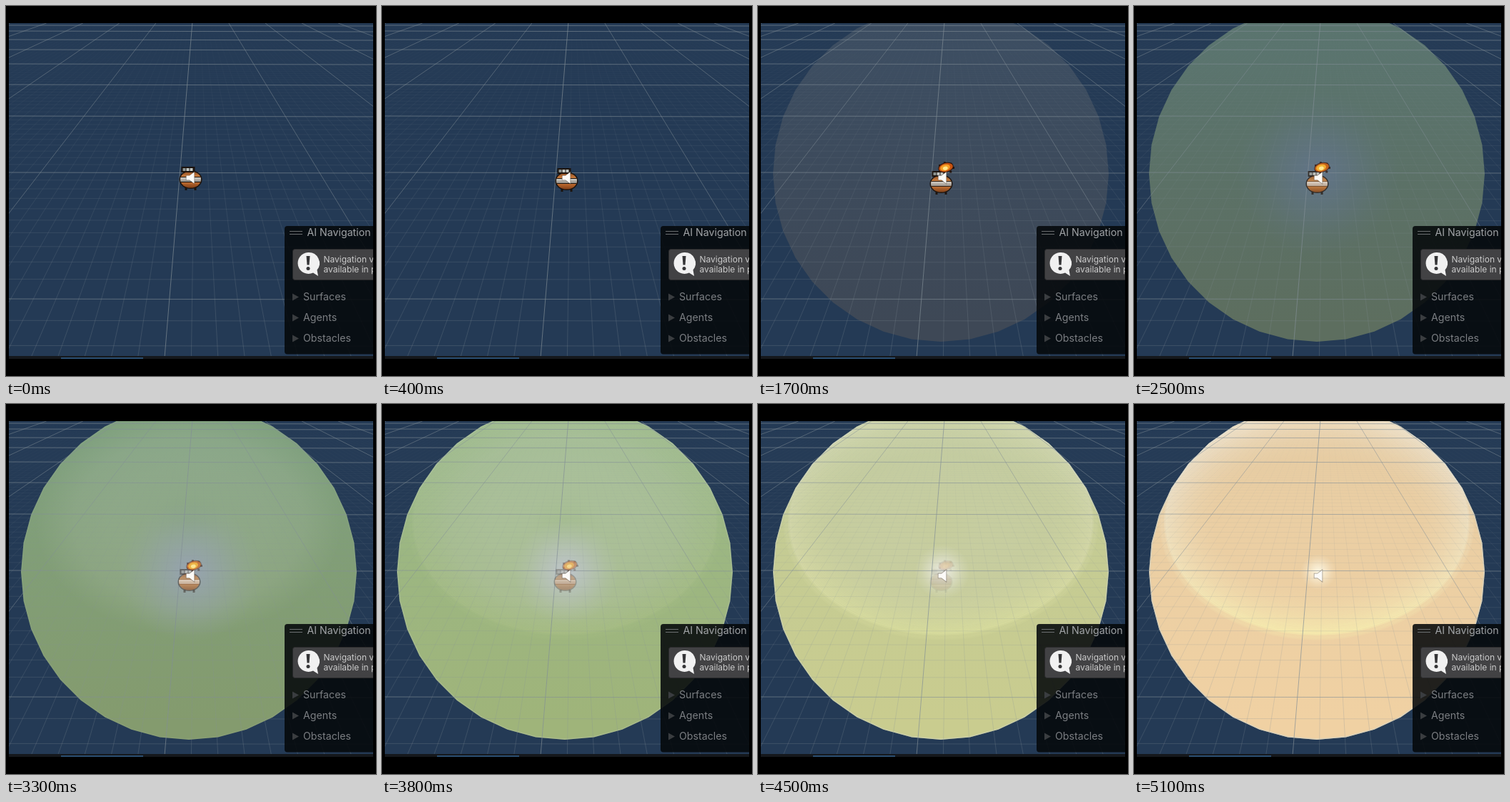
These frames come from a looping animation (518x518 px, 5.2 s). An HTML page with a canvas:

```html
<!DOCTYPE html>
<html lang="en">
<head>
<meta charset="utf-8">
<title>Charge sphere</title>
<style>
  html, body { margin: 0; width: 100%; height: 100%; overflow: hidden; background: #000; }
  canvas, svg { position: absolute; left: 0; top: 0; width: 518px; height: 518px; display: block; }
  text { font-family: Inter, Roboto, sans-serif; }
  .head { font-size: 14.2px; fill: #a0a3a6; }
  .note { font-size: 12px; fill: #cbcbcb; }
  .item { font-size: 14.2px; fill: #7b7e82; }
</style>
</head>
<body>
<canvas id="stage" width="518" height="518"></canvas>
<svg viewBox="0 0 518 518">
  <defs><clipPath id="view"><rect x="4" y="24" width="510" height="466"/></clipPath></defs>
  <g clip-path="url(#view)">
    <rect x="390" y="308" width="140" height="179.500" rx="4" fill="#05080b" fill-opacity=".88"/>
    <path d="M397 315.500h18M397 319.500h18" stroke="#6b6e70"/>
    <text class="head" x="421.500" y="322">AI Navigation</text>
    <rect x="401.500" y="340.500" width="130" height="43" rx="3" fill="#424244" stroke="#29292b"/>
    <path d="M423 345a15 15 0 1 0 7 28.500L437 378 435.500 369.500A15 15 0 0 0 423 345z" fill="#f1f1f1"/>
    <path d="M420.500 350h5l-1 12.500h-3z" fill="#353537"/>
    <circle cx="423" cy="367.500" r="2.500" fill="#353537"/>
    <text class="note" x="444.500" y="358.500">Navigation visuals</text>
    <text class="note" x="444.500" y="373">available in play mode</text>
    <path d="M401 402.500l9 5-9 5zM401 431.500l9 5-9 5zM401 460.500l9 5-9 5z" fill="#3a3d40"/>
    <text class="item" x="416" y="412">Surfaces</text>
    <text class="item" x="416" y="441">Agents</text>
    <text class="item" x="416" y="470">Obstacles</text>
  </g>
</svg>
<script>
const LOOP = 5200, STEP = 100, LIT = 600;
const c = document.getElementById('stage').getContext('2d');

const rgba = (v, a = 1) => `rgba(${v.map(Math.round).join()},${a})`;
const ramp = (u, a, b) => Math.min(1, Math.max(0, (u - a) / (b - a)));
const smooth = p => p * p * (3 - 2 * p);
const bump = p => Math.sin(Math.PI * p);

function stateAt(t) {
  const u = ramp(t, LIT, LOOP - STEP);
  const core = smooth(ramp(u, .3, 1)), late = ramp(u, .55, 1);
  const r = 36 + 196 * u ** 1.5;
  const g = 58 + 147 * smooth(ramp(u, .05, .92));
  const b = 85 + 78 * u ** 1.3;
  return {
    top: [r, g, b],
    bottom: [r + 8 * u, g + 4 * u - 8 * bump(u), b - 16 * bump(u)],
    core: [84 + 171 * core, 104 + 148 * core, 100 + 135 * core + 30 * bump(u)],
    coreA: .9 * smooth(ramp(u, .22, .42)),
    coreR: 115 - 90 * smooth(ramp(u, .45, 1)),
    disc: .3 * bump(ramp(u, .5, 1)),
    rim: .34 * late * late,
    edge: .6 * late,
    bomb: 1 - smooth(ramp(u, .15, 1))
  };
}

// Colours spread evenly along the gradient
function fade(g, cols) {
  cols.forEach((col, i) => g.addColorStop(i / (cols.length - 1), col));
  return g;
}
const vertical = (y0, y1, ...cols) => fade(c.createLinearGradient(0, y0, 0, y1), cols);

function box(col, x, y, w, h) {
  c.fillStyle = col;
  c.fillRect(x, y, w, h);
}

function line(x0, y0, x1, y1, style) {
  c.strokeStyle = style;
  c.beginPath();
  c.moveTo(x0, y0);
  c.lineTo(x1, y1);
  c.stroke();
}

// Ground plane in perspective
const rowY = n => 1 / (.002174 + .001362 * n) - 50;
const colX = (k, y) => 267 + (y + 50) * (.69 * k - .083);
const grey = a => rgba([130, 142, 150], a);
const minor = vertical(24, 490, grey(0), grey(.1), grey(.19), grey(.27));

function grid() {
  c.lineWidth = 1;
  for (let i = -60; i <= 60; i++) {
    const k = i / 10;
    line(colX(k, 24), 24, colX(k, 490), 490, i % 10 ? minor : grey(i ? .5 : .68));
  }
  for (let i = -2; i < 90; i++) {
    const y = rowY(i / 10), main = i % 10 === 0;
    const mid = main ? Math.round(y) + .5 : y;
    line(4, mid - .5, 514, mid + .5, main ? grey(.6) : minor);
  }
}

function radial(x, y, r, squash, ...cols) {
  c.save();
  c.translate(x, y);
  c.scale(1, squash);
  c.fillStyle = fade(c.createRadialGradient(0, 0, 0, 0, 0, r), cols);
  c.fillRect(-r, -r, 2 * r, 2 * r);
  c.restore();
}

function sphere(s) {
  const SIDES = 36, pale = a => rgba([205, 210, 200], a);
  c.save();
  c.beginPath();
  for (let i = 0; i < SIDES; i++) {
    const a = i * 2 * Math.PI / SIDES;
    c.lineTo(256 + 235 * Math.sin(a), 235 + 235 * Math.cos(a));
  }
  c.closePath();
  c.fillStyle = vertical(60, 440, rgba(s.top), rgba(s.bottom));
  c.fill();
  c.clip();
  c.strokeStyle = pale(s.edge);
  c.lineWidth = 3;
  c.stroke();
  radial(256, 165, 214, .74, pale(s.disc * .7), pale(s.disc), pale(s.disc), pale(s.disc * .8), pale(0));
  // Ring where the ball meets the ground, fading inwards
  c.strokeStyle = vertical(24, 322, '#f4f2ea', '#ecebe0', '#f4f0cc', '#fbffb4');
  c.lineWidth = 4;
  for (let i = -3; i < 34; i++) {
    c.globalAlpha = s.rim * (i < 0 ? .3 : (1 - i / 34) ** 2);
    c.beginPath();
    c.ellipse(256, 165, 212 - i * 2.2, 157 - i * 2.2, 0, 0, 7);
    c.stroke();
  }
  c.globalAlpha = 1;
  const core = a => rgba(s.core, s.coreA * a);
  radial(258, 235, s.coreR, 1, core(1), core(.72), core(.45), core(.18), core(0));
  c.restore();
}

function oval(x, y, rx, ry, col) {
  c.beginPath();
  c.ellipse(x, y, rx, ry, 0, 0, 7);
  c.fillStyle = col;
  c.fill();
}

function flame(size) {
  c.translate(6.5, -22);
  c.scale(size, size);
  for (let i = 0; i < 7; i++) {
    const a = i * .9;
    box('#21110b', 10 * Math.cos(a) - 1, 7 * Math.sin(a) - 1, 3, 3);
  }
  c.rotate(-.25);
  oval(0, 0, 11, 7, '#2b1208');
  oval(0, 0, 10, 6, '#c9520f');
  oval(-1, 0, 7, 4.3, '#f59a22');
  oval(-1, 1, 3.5, 2.5, '#ffe58a');
}

function bomb(t) {
  const lit = t >= LIT, dark = '#1b130e';
  c.save();
  c.translate(lit ? 256.5 : 258.5, lit ? 248 : t >= 400 ? 244 : 242);
  for (const x of [-8, 5]) box(dark, x, 12, 3, 4);
  oval(0, 1, 16, 13, dark);
  c.save();
  c.beginPath();
  c.ellipse(0, 1, 14.5, 11.5, 0, 0, 7);
  c.clip();
  box(vertical(-11, 13, '#8a4a20', '#d08040', '#c06c30', '#7c3c16'), -16, -11, 32, 25);
  box(dark, -16, -3, 32, 8);
  box(vertical(-2, 4, '#d4d1ca', '#918d87'), -16, -2, 32, 6);
  c.restore();
  box(dark, -13, -17, 19, 8);
  for (let x = -11; x < 4; x += 5) box(x < -8 ? '#8d9593' : '#c2c8c4', x, -15, 4, 4);
  if (lit) flame(.4 + .6 * ramp(t, LIT, LIT + 400));
  c.restore();
}

function speaker() {
  c.beginPath();
  c.moveTo(252.5, 237.5);
  c.lineTo(257, 237.5);
  c.lineTo(263.5, 232.5);
  c.lineTo(263.5, 248.5);
  c.lineTo(257, 243.5);
  c.lineTo(252.5, 243.5);
  c.closePath();
  c.strokeStyle = 'rgba(90,80,70,.55)';
  c.lineWidth = 1.5;
  c.stroke();
  c.fillStyle = '#fbfaf7';
  c.fill();
}

function draw(t) {
  const s = stateAt(t);
  box('#000', 0, 0, 518, 518);
  box('#15181c', 4, 490, 510, 4);
  box('#2b4f73', 77, 492, 115, 2);
  c.save();
  c.beginPath();
  c.rect(4, 24, 510, 466);
  c.clip();
  box('#243a55', 4, 24, 510, 466);
  if (t >= LIT) sphere(s);
  grid();
  c.globalAlpha = s.bomb;
  bomb(t);
  // The glow lifts the bomb's bright parts as it fades
  c.globalCompositeOperation = 'screen';
  c.globalAlpha = 2 * s.bomb * (1 - s.bomb);
  bomb(t);
  c.globalCompositeOperation = 'source-over';
  c.globalAlpha = 1;
  speaker();
  c.restore();
}

const start = performance.now();
function tick() {
  const t = (performance.now() - start) % LOOP;
  draw(Math.floor(t / STEP) * STEP);
  requestAnimationFrame(tick);
}
tick();
</script>
</body>
</html>
```
